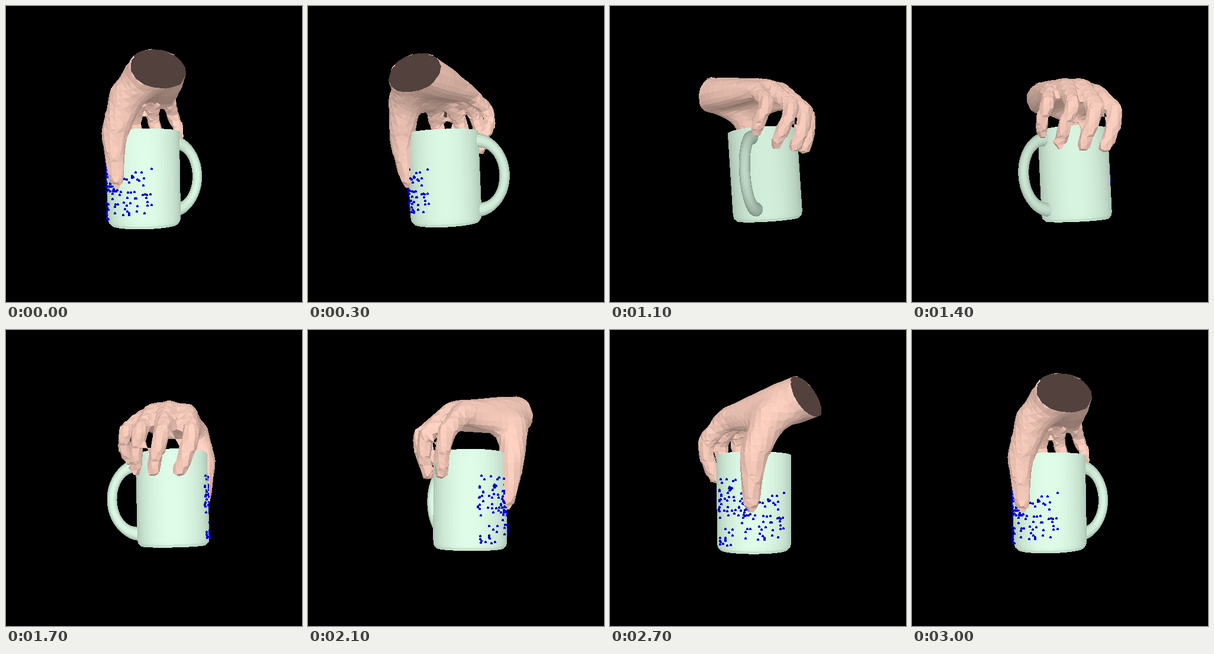
These frames come from a looping animation (500 by 500 pixels, 3100 ms). An HTML page with a canvas:

```html
<!DOCTYPE html>
<html lang="en">
<head>
<meta charset="utf-8">
<title>Hand holding a mug</title>
<style>
  html, body { margin: 0; width: 100%; height: 100%; overflow: hidden; background: #000; }
  canvas { display: block; width: 500px; height: 500px; }
</style>
</head>
<body>
<canvas id="view" width="500" height="500"></canvas>
<script>
const SIZE = 500, EYE = 680, HORIZON = 299, AXIS = 257.5, ROLL = 0.03;
const STEP_MS = 100, STEPS = 31, RAD = Math.PI / 180;
const SKIN = { rgb: [255, 210, 194], base: 0.66, face: 0.34, down: 0.14, dim: 0.03 };
const MUG = { rgb: [223, 253, 232], base: 0.74, face: 0.26, down: 0, dim: 0.06 };
const HANDLE = { ...MUG, base: 0.6, face: 0.38, down: 0.04, dim: 0.13 };
const INSIDE = [82, 65, 61];
const CUP = { x: -23.5, z: 8.5, top: 212, bottom: 365, r: 60.5, leanX: 0.0104, leanZ: 0.0376 };

const sub = (a, b) => a.map((v, i) => v - b[i]);
const mix = (a, b, t) => a.map((v, i) => v + (b[i] - v) * t);
const dot = (a, b) => a[0] * b[0] + a[1] * b[1] + a[2] * b[2];
const cross = (a, b) => [
  a[1] * b[2] - a[2] * b[1], a[2] * b[0] - a[0] * b[2], a[0] * b[1] - a[1] * b[0]
];
const unit = v => { const l = Math.hypot(...v) || 1; return v.map(c => c / l); };
const clamp = (v, lo, hi) => Math.min(hi, Math.max(lo, v));

const faces = [];
function addFace(a, b, c, mat, outward) {
  let n = unit(cross(sub(b, a), sub(c, a)));
  if (outward && dot(n, outward) < 0) n = n.map(v => -v);
  faces.push({ a, b, c, n, mat });
}

// Mug coordinates, leaning a little
const onMug = (x, y, z) => [
  x + CUP.x + CUP.leanX * (CUP.bottom - y),
  y + x * CUP.leanX + z * CUP.leanZ,
  z + CUP.z + CUP.leanZ * (CUP.bottom - y)
];
const around = (deg, y, r) => onMug(r * Math.cos(deg * RAD), y, r * Math.sin(deg * RAD));

// Chains of round joints: x, y, z, radius. Fingers run from index (0) to little (3)
// and end on the surface of the mug.
function finger(i) {
  const slim = 0.8 * i;
  const wrist = [9 + 3 * i, 132, 155, 30];
  const knuckle = [-60 + 27 * i, 142 + 4 * (i - 1.5) ** 2, -20 + 4 * (i - 1.75) ** 2, 17 - slim];
  const bend = [-80 + 37.5 * i, 186 - 3 * i, -68 + 10 * (i - 1.6) ** 2, 14.5 - slim];
  const tip = [...around(-122 + 36 * i - 2 * i * i, 249 - i ** 3, 71), 12 - slim / 2];
  const palm = mix(wrist, knuckle, 0.5);
  palm[3] = 26;
  const last = mix(bend, tip, 0.5);
  const out = unit([last[0] - CUP.x, 0, last[2] - CUP.z]);
  return [wrist, palm, knuckle, bend, [...out.map((v, k) => last[k] + 5 * v), last[3]], tip];
}
const THUMB = [[4, 140, 112, 24], [-42, 167, 84, 25], [-63, 222, 70, 21], [-64, 262, 65, 15.5], [-62, 294, 59, 12.5]];
const WEB = [[-42, 167, 82, 23], [-56, 154, 0, 17]];
const CHAINS = [0, 1, 2, 3].map(finger).concat([THUMB, WEB]);
const wristCut = (x, y) => 111 - 0.32 * (x - 8) + 0.36 * (y - 133);

function boneDistance(p, a, b) {
  const ab = sub(b, a), h = clamp(dot(sub(p, a), ab) / dot(ab, ab), 0, 1);
  const c = mix(a, b, h);
  return Math.hypot(p[0] - c[0], p[1] - c[1], p[2] - c[2]) - c[3];
}

function handField(p) {
  const blend = 8;
  let d = 1e3;
  for (const chain of CHAINS) {
    let e = 1e3;
    for (let i = 1; i < chain.length; i++) e = Math.min(e, boneDistance(p, chain[i - 1], chain[i]));
    const h = Math.max(blend - Math.abs(d - e), 0) / blend;
    d = Math.min(d, e) - h * h * blend / 4;
  }
  return d;
}

function gradient(p) {
  const at = (i, s) => handField(p.map((v, k) => k === i ? v + s : v));
  return [0, 1, 2].map(i => at(i, 1) - at(i, -1));
}

// Coarse surface net around the blended joints, left open at the wrist
function buildHand() {
  const cell = 11, org = [-118, 82, -106], n = [18, 23, 25];
  const stride = [1, n[0], n[0] * n[1]];
  const values = new Float32Array(n[0] * n[1] * n[2]);
  const each = fn => {
    for (let i = 0; i < values.length; i++) {
      fn([i % n[0], Math.floor(i / n[0]) % n[1], Math.floor(i / stride[2])], i);
    }
  };
  each((g, i) => { values[i] = handField(g.map((v, k) => org[k] + v * cell)); });

  const verts = [];
  each((g, i) => {
    if (g.some((v, k) => v > n[k] - 2)) return;
    const sum = [0, 0, 0];
    let hits = 0;
    for (let c = 0; c < 8; c++) for (let k = 0; k < 3; k++) {
      if (c >> k & 1) continue;
      const off = [c & 1, c >> 1 & 1, c >> 2 & 1];
      const j = i + dot(off, stride), v = values[j], w = values[j + stride[k]];
      if ((v < 0) === (w < 0)) continue;
      off[k] += v / (v - w);
      off.forEach((o, m) => sum[m] += o);
      hits++;
    }
    if (!hits) return;
    const p = sum.map((s, k) => org[k] + (g[k] + s / hits) * cell);
    const end = wristCut(p[0], p[1]), beyond = p[2] > end;
    if (beyond) p[2] = end;
    verts[i] = { p, beyond };
  });

  each((g, i) => {
    for (let k = 0; k < 3; k++) {
      const b = (k + 1) % 3, c = (k + 2) % 3;
      if (g[k] > n[k] - 2 || !g[b] || !g[c]) continue;
      if ((values[i] < 0) === (values[i + stride[k]] < 0)) continue;
      const q = [i, i - stride[b], i - stride[b] - stride[c], i - stride[c]].map(j => verts[j]);
      for (const t of [[q[0], q[1], q[2]], [q[0], q[2], q[3]]]) {
        if (t.some(v => !v) || t.every(v => v.beyond)) continue;
        const [u, v, w] = t.map(s => s.p);
        addFace(u, v, w, SKIN, gradient(u.map((s, m) => (s + v[m] + w[m]) / 3)));
      }
    }
  });
}

function addSheet(nu, nv, fn, mat) {
  for (let i = 0; i < nu; i++) for (let j = 0; j < nv; j++) {
    const at = (di, dj) => fn((i + di) / nu, (j + dj) / nv);
    addFace(at(0, 0), at(1, 0), at(1, 1), mat);
    addFace(at(0, 0), at(1, 1), at(0, 1), mat);
  }
}

function buildMug() {
  addSheet(64, 32, (u, v) =>
    around(u * 360, CUP.top + (CUP.bottom - CUP.top) * v, CUP.r * (1 - 0.1 * v ** 45)), MUG);
  const hc = Math.cos(-24 * RAD), hs = Math.sin(-24 * RAD);
  addSheet(32, 16, (u, v) => {
    const t = (u - 0.5) * Math.PI, a = v * 2 * Math.PI;
    const r = 8.5 + 3 * Math.sin(t) ** 8;
    const out = 56 + (46 + r * Math.cos(a)) * Math.cos(t), side = r * Math.sin(a);
    const y = 286 + (58 + r * Math.cos(a)) * Math.sin(t);
    return onMug(out * hc - side * hs, y, out * hs + side * hc);
  }, HANDLE);
}

const dots = [];
function buildDots() {
  let seed = 11;
  const rnd = (lo, hi) => {
    seed = (seed * 16807) % 2147483647;
    return lo + (hi - lo) * seed / 2147483647;
  };
  const scatter = (count, a0, a1, y0, y1) => {
    while (count--) dots.push(around(rnd(a0, a1), rnd(y0, y1), CUP.r + 0.5));
  };
  scatter(50, 135, 188, 251, 312);
  scatter(66, 76, 148, 272, 343);
  scatter(14, 156, 185, 328, 356);
}

const ctx = document.getElementById("view").getContext("2d");
const image = ctx.createImageData(SIZE, SIZE);
const pixels = new Uint32Array(image.data.buffer);
const depth = new Float32Array(SIZE * SIZE);
const pack = (r, g, b) => (255 << 24 | b << 16 | g << 8 | r) >>> 0;

function fillTriangle(a, b, c, color) {
  const area = (b[0] - a[0]) * (c[1] - a[1]) - (b[1] - a[1]) * (c[0] - a[0]);
  if (!area) return;
  const range = k => [
    Math.max(0, Math.ceil(Math.min(a[k], b[k], c[k]))),
    Math.min(SIZE - 1, Math.floor(Math.max(a[k], b[k], c[k])))
  ];
  const [x0, x1] = range(0), [y0, y1] = range(1);
  for (let y = y0; y <= y1; y++) for (let x = x0; x <= x1; x++) {
    const u = ((x - a[0]) * (c[1] - a[1]) - (y - a[1]) * (c[0] - a[0])) / area;
    const v = ((b[0] - a[0]) * (y - a[1]) - (b[1] - a[1]) * (x - a[0])) / area;
    if (u < 0 || v < 0 || u + v > 1) continue;
    const z = a[2] + u * (b[2] - a[2]) + v * (c[2] - a[2]), i = y * SIZE + x;
    if (z > depth[i]) { depth[i] = z; pixels[i] = color; }
  }
}

function render(deg) {
  const cs = Math.cos(deg * RAD), sn = Math.sin(deg * RAD);
  const bob = 3 * Math.cos((deg - 312) * RAD);
  const shadow = Math.max(0, Math.cos((deg - 110) * RAD));
  const turn = p => [p[0] * cs - p[2] * sn, p[1], p[0] * sn + p[2] * cs];
  const project = p => {
    const s = EYE / (EYE - p[2]), x = p[0] * s, y = HORIZON + (p[1] - HORIZON) * s;
    return [AXIS + x - ROLL * (370 - y), y - ROLL * x + bob, p[2]];
  };
  pixels.fill(pack(0, 0, 0));
  depth.fill(-1e6);

  for (const { a, b, c, n, mat } of faces) {
    const p = turn(a), normal = turn(n);
    let facing = dot(normal, unit([-p[0], HORIZON - p[1], EYE - p[2]])), rgb = INSIDE;
    if (mat !== SKIN) facing = Math.abs(facing);
    if (facing >= 0) {
      const k = (mat.base + mat.face * facing - mat.down * normal[1]) * (1 - mat.dim * shadow);
      rgb = mat.rgb.map(v => Math.min(255, v * k));
    }
    fillTriangle(project(p), project(turn(b)), project(turn(c)), pack(...rgb));
  }

  for (const d of dots) {
    const p = project(turn(d)), cx = Math.round(p[0]), cy = Math.round(p[1]);
    for (let y = -2; y < 2; y++) for (let x = -2; x < 2; x++) {
      if ((x === -2 || x === 1) && y === -2) continue;
      const i = (cy + y) * SIZE + cx + x;
      if (p[2] + 4 > depth[i]) pixels[i] = pack(0, 0, 205);
    }
  }
  ctx.putImageData(image, 0, 0);
}

buildHand();
buildMug();
buildDots();

const start = performance.now();
let shown = -1;
function tick() {
  const step = Math.floor((performance.now() - start) / STEP_MS) % STEPS;
  if (step !== shown) {
    shown = step;
    render(step * 360 / (STEPS - 1));
  }
  requestAnimationFrame(tick);
}
tick();
</script>
</body>
</html>
```
